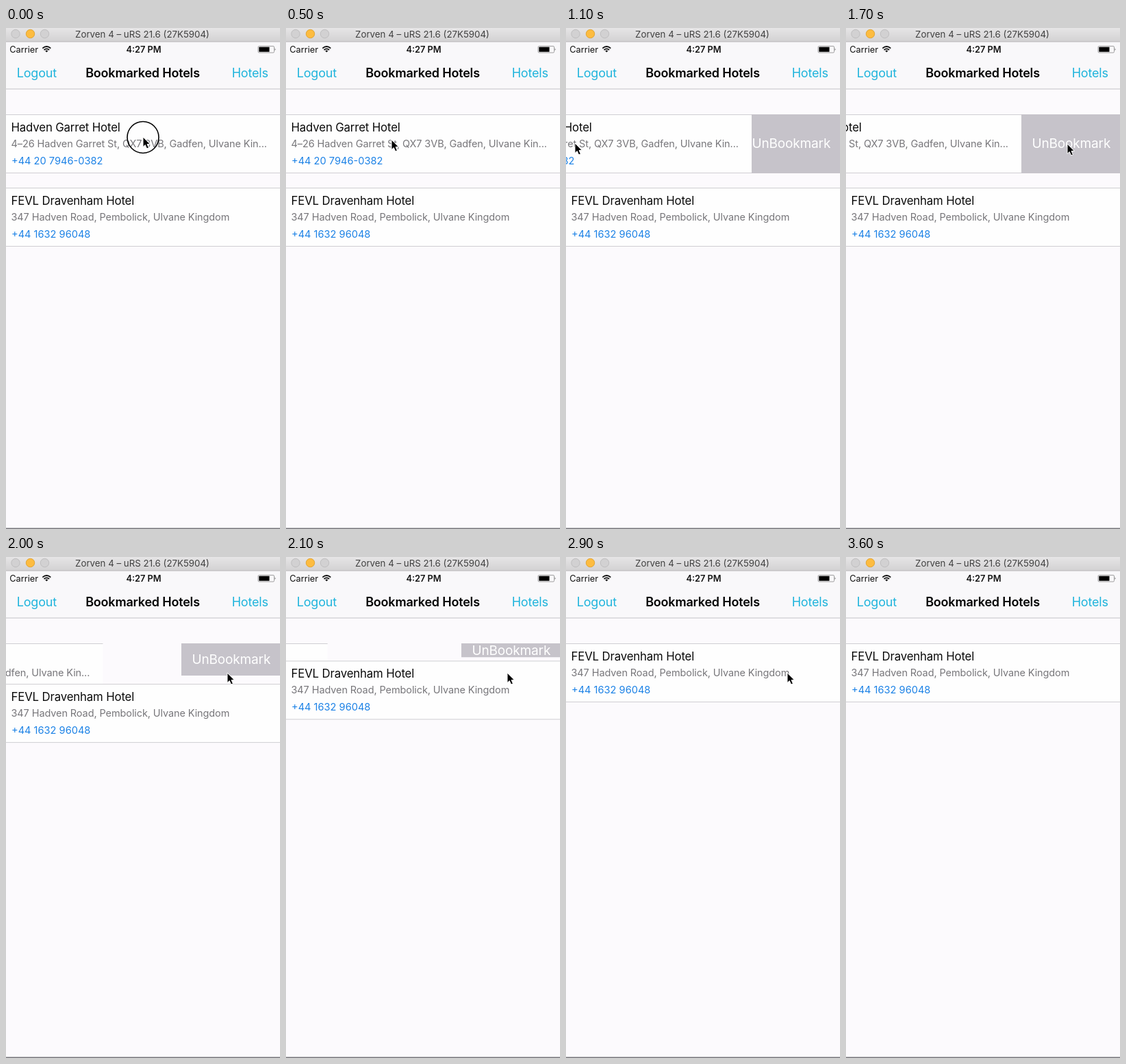
An HTML page that plays this animation: 400 px wide and 731 px high, repeating every 3700 ms.

```html
<!DOCTYPE html>
<html lang="en">
<head>
<meta charset="utf-8">
<title>Bookmarked Hotels</title>
<style>
  html, body { margin: 0; height: 100%; overflow: hidden; background: #fcfafd; }
  svg { display: block; }
  #stage { width: 100vw; height: 100vh; }
  text { font-family: Inter, Roboto, "Liberation Sans", sans-serif; fill: #000; white-space: pre; }
  .window { font-size: 13.3px; fill: #404040; text-anchor: middle; }
  .status { font-size: 12.8px; fill: #111; }
  .nav { font-size: 18px; letter-spacing: -.2px; }
  .link { fill: #1fb4dc; }
  .bold { font-weight: 600; text-anchor: middle; }
  .name { font-size: 16.8px; letter-spacing: -.15px; fill: #0a0a0a; }
  .address { font-size: 14.5px; letter-spacing: -.1px; fill: #77767a; }
  .phone { font-size: 14.6px; fill: #1c82e6; }
  .action { font-size: 19px; letter-spacing: -.15px; fill: #fff; }
  .light { fill: #d2d1d2; stroke: #bfbebf; }
  .line { fill: #cfced2; }
</style>
</head>
<body>
<svg id="stage" viewBox="0 0 400 731">
  <defs>
    <linearGradient id="chrome" x2="0" y2="1">
      <stop stop-color="#e6e5e6"/><stop offset="1" stop-color="#d2d1d2"/>
    </linearGradient>
  </defs>
  <rect width="400" height="731" fill="#fcfafd"/>

  <svg id="button" x="256" y="126" width="144" height="86">
    <rect width="144" height="86" fill="#c6c3ca"/>
    <text id="label" class="action" x="15.5">UnBookmark</text>
  </svg>
  <g id="first"></g>
  <g id="second"></g>

  <rect y="20" width="400" height="69" fill="#f9f8fa"/>
  <rect y="88.5" width="400" height="1" fill="#c4c3c7"/>
  <rect width="400" height="20" fill="url(#chrome)"/>
  <rect y="19.5" width="400" height="1" fill="#b9b8b9"/>
  <circle class="light" cx="14" cy="8.5" r="6.2"/>
  <circle cx="35.5" cy="8.5" r="6.2" fill="#fdbc40" stroke="#e0a432"/>
  <circle class="light" cx="56.5" cy="8.5" r="6.2"/>
  <text class="window" x="199" y="13.5">Zorven 4 – uRS 21.6 (27K5904)</text>

  <text class="status" x="5.2" y="36">Carrier</text>
  <g fill="none" stroke="#111" stroke-width="1.8">
    <path d="M53.3 29.6Q59.3 24.4 65.3 29.6M55.5 32Q59.3 28.8 63.1 32"/>
    <path d="M57.2 33.3Q59.3 31.9 61.4 33.3L59.3 35.6Z" fill="#111" stroke="none"/>
  </g>
  <text class="status bold" x="201" y="36">4:27 PM</text>
  <rect x="368" y="26.5" width="23.5" height="9.5" rx="1.5" fill="none" stroke="#888" stroke-width=".8"/>
  <rect x="369.3" y="27.8" width="15.2" height="7" rx=".5"/>
  <path d="M392.7 29.5q1.6 1.7 0 3.5z" fill="#333"/>

  <text class="nav link" x="15.8" y="72">Logout</text>
  <text class="nav bold" x="199.5" y="72">Bookmarked Hotels</text>
  <text class="nav link" x="382.7" y="72" text-anchor="end">Hotels</text>
  <rect y="729.5" width="400" height="1.5" fill="#77767a"/>

  <g id="cursor">
    <circle id="ring" cy=".5" r="23" fill="none" stroke="#000" stroke-width="1.6"/>
    <path d="M0 0V14.5L3.3 11.6L5.6 17L8.4 15.8L6.1 10.6H10.4Z" stroke="#fff" stroke-width="1"/>
  </g>
</svg>
<script>
const $ = id => document.getElementById(id);
const LOOP = 3700, STEP = 100;
const ROW_GAP = 107, ROW_H = 85, OPEN = 144;

// time, x, y of the pointer tip
const PATH = [
  [0, 200, 159], [100, 200, 159], [500, 154, 163], [600, 154, 163],
  [1100, 13, 168], [1200, 13, 168], [1600, 323, 169], [LOOP, 323, 169]
];

const row = (name, address, phone) => `
  <rect y="126" width="400" height="86" fill="#fefefe"/>
  <rect class="line" y="126" width="400" height="1"/>
  <rect class="line" y="211" width="400" height="1"/>
  <text class="name" x="7.5" y="151">${name}</text>
  <text class="address" x="7.5" y="174">${address}</text>
  <text class="phone" x="8" y="199">${phone}</text>`;

$('first').innerHTML = row('Hadven Garret Hotel',
  '4–26 Hadven Garret St, QX7 3VB, Gadfen, Ulvane Kin...', '+44 20 7946-0382');
$('second').innerHTML = row('FEVL Dravenham Hotel',
  '347 Hadven Road, Pembolick, Ulvane Kingdom', '+44 1632 96048');

const clamp = u => Math.min(1, Math.max(0, u));
const smooth = u => u * u * (3 - 2 * u);
const easeOut = u => 1 - (1 - u) ** 3;
const move = (id, x, y) => $(id).setAttribute('transform', `translate(${x} ${y})`);
const show = (id, on) => $(id).setAttribute('visibility', on ? 'visible' : 'hidden');

function pointer(t) {
  const i = PATH.findIndex(p => p[0] > t);
  const [t0, x0, y0] = PATH[i - 1], [t1, x1, y1] = PATH[i];
  const u = smooth((t - t0) / (t1 - t0));
  return [x0 + (x1 - x0) * u, y0 + (y1 - y0) * u];
}

function draw(t) {
  const [x, y] = pointer(t);
  const gone = easeOut(clamp((t - 1911) / 496));

  // the swipe follows the pointer, then snaps open
  const swipe = t < 600 ? 0 : t < 1200 ? Math.max(0, 142 - x) : OPEN;
  move('first', -(swipe + (400 - OPEN) * gone), 0);
  move('second', 0, ROW_GAP * (1 - gone));

  const height = ROW_H * (1 - gone);
  $('button').setAttribute('height', height + (gone ? 0 : 1));
  $('label').setAttribute('y', height / 2 + 6.7);
  show('button', swipe > 0 && gone < 1);
  show('first', gone < 1);

  move('cursor', x, y);
  show('cursor', t < 3100);
  // pressed at the start and on the button
  $('ring').setAttribute('opacity', t < 100 || t === 1800 ? 1 : 0);
}

const start = performance.now();
function tick() {
  const t = (performance.now() - start) % LOOP;
  draw(Math.floor(t / STEP) * STEP);
  requestAnimationFrame(tick);
}
tick();
</script>
</body>
</html>
```
